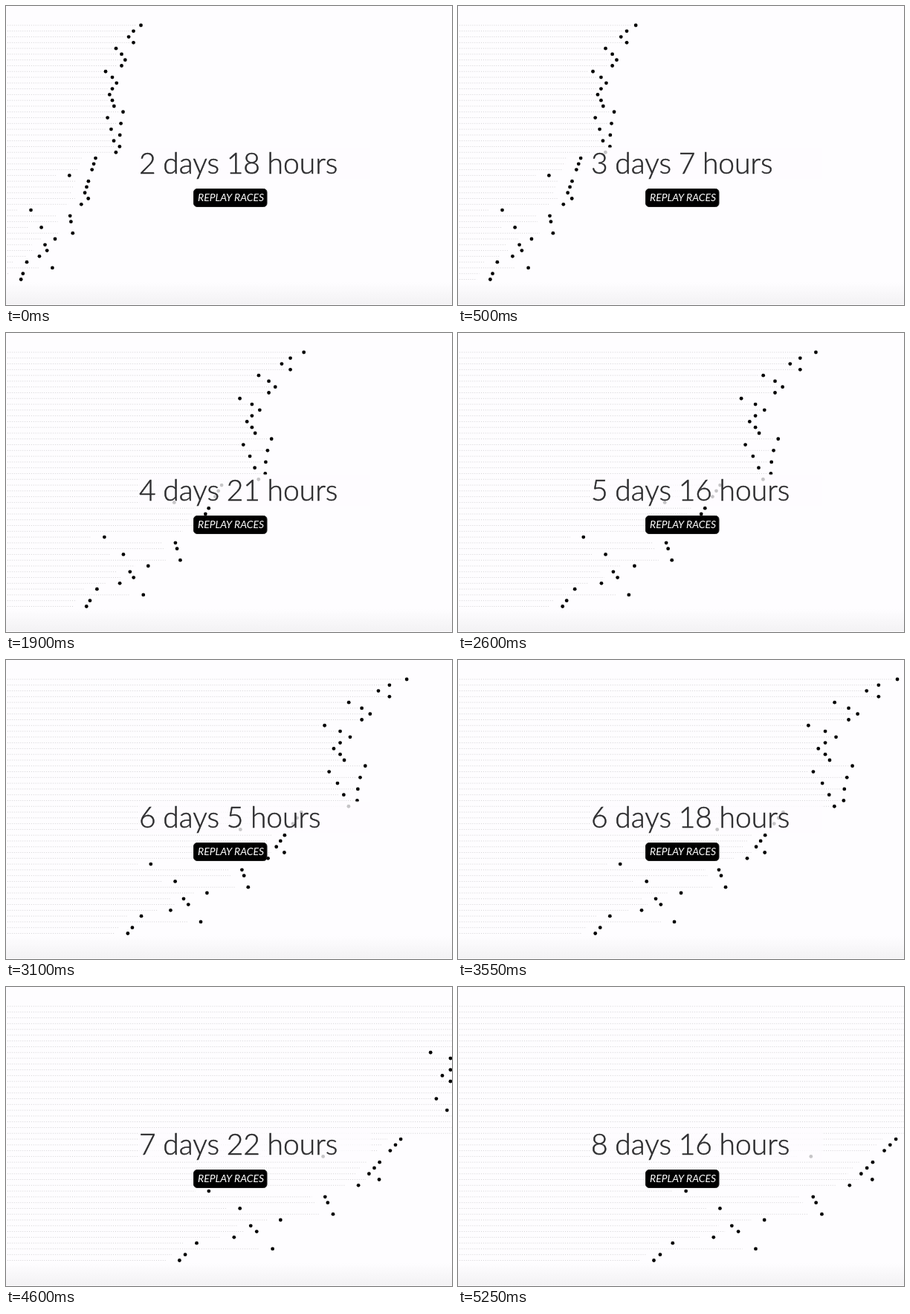
An HTML page for the animation above (5300 ms loop, 600 by 403 pixels).

```html
<!DOCTYPE html>
<html lang="en">
<head>
<meta charset="utf-8">
<title>Race replay</title>
<style>
  html, body { margin: 0; width: 100%; height: 100%; overflow: hidden; background: #fefdff; }
  svg { display: block; width: 600px; height: 403px; }
  text { font-family: Lato, "Open Sans", sans-serif; }
  #clock { font-size: 39px; font-weight: 300; fill: #2c2c2e; stroke: #2c2c2e; stroke-width: .5; word-spacing: -1px; }
  #label { font-size: 14px; font-style: italic; fill: #fff; }
  #lanes line { stroke: #d2d1d4; stroke-width: 1; stroke-dasharray: 1 1.9; }
</style>
</head>
<body>
<svg viewBox="0 0 600 403">
  <defs>
    <linearGradient id="shade" x1="0" y1="0" x2="0" y2="1">
      <stop offset="0" stop-color="#fefdff"/>
      <stop offset="1" stop-color="#f3f2f4"/>
    </linearGradient>
  </defs>
  <rect width="600" height="403" fill="#fefdff"/>
  <rect y="372" width="600" height="30" fill="url(#shade)"/>
  <g id="lanes"></g>
  <g id="racers"></g>
  <rect x="179" y="190.5" width="311" height="42.5" fill="#fefdff" fill-opacity=".78"/>
  <text id="clock" x="179" y="226"></text>
  <rect x="252.5" y="246.5" width="98.5" height="24" rx="4.5" stroke="#1a1a1a"/>
  <text id="label" x="258" y="263">REPLAY RACES</text>
</svg>
<script>
const LOOP = 5300, STEP = 50;
const TOP = 26, ROW_GAP = 7.784;
// Every racer has run for LEAD ms from x = -ORIGIN when the loop begins.
const LEAD = 2337, ORIGIN = 88.1;
const HOURS_AT_START = 66.1, HOURS_PER_MS = 142 / 5250;

// Each pack is a sloping line with a fading ripple; a swing turns by wave per row.
const HALF = Math.PI, QUARTER = Math.PI / 2, FADE = .8;
const packs = [
  { size: 4, x: 171.5, swing: 10, wave: QUARTER },
  { size: 4, x: 155.5, swing: -7.5, wave: QUARTER },
  { size: 7, x: 143, swing: -9, wave: QUARTER },
  { size: 8, x: 145.5, slope: .7, swing: 12, wave: HALF },
  { size: 9, x: 120.5, slope: -2.4 },
  { size: 5, x: 85, slope: 1.2 },
  { size: 4, x: 61, slope: -4.5, swing: 5, wave: HALF },
  { size: 4, x: 28, slope: -2.6 }
];
// Rows that have left their pack, and by how much
const strays = { 26: -28, 30: 7, 32: -51.5, 35: -41, 42: 37 };

const clock = document.getElementById("clock");

function add(parent, tag, attrs) {
  const el = document.createElementNS("http://www.w3.org/2000/svg", tag);
  for (const key in attrs) el.setAttribute(key, attrs[key]);
  return document.getElementById(parent).appendChild(el);
}

function packStarts({ size, x, slope = 0, swing = 0, wave = 0 }) {
  return Array.from({ length: size }, (_, k) =>
    x + slope * k + swing * FADE ** k * Math.cos(wave * k));
}

const racers = packs.flatMap(packStarts).map((x, row) => {
  const y = TOP + row * ROW_GAP;
  return {
    x: x + (strays[row] || 0),
    gap: row < 23 ? 6 : 18,
    lane: add("lanes", "line", { x1: 2, y1: y, x2: 2, y2: y }),
    dot: add("racers", "circle", { cy: y, r: 2.4 })
  };
});

function draw(now) {
  const t = Math.floor(now % LOOP / STEP) * STEP;
  const scale = 1 + t / LEAD;
  for (const r of racers) {
    const x = (r.x + ORIGIN) * scale - ORIGIN;
    r.dot.setAttribute("cx", x.toFixed(2));
    r.lane.setAttribute("x2", Math.min(600, Math.max(2, x - r.gap)).toFixed(2));
  }
  const hours = Math.floor(HOURS_AT_START + t * HOURS_PER_MS);
  clock.textContent = `${Math.floor(hours / 24)} days ${hours % 24} hours`;
}

const begin = performance.now();
function tick() {
  draw(performance.now() - begin);
  requestAnimationFrame(tick);
}
draw(0);
requestAnimationFrame(tick);
</script>
</body>
</html>
```
